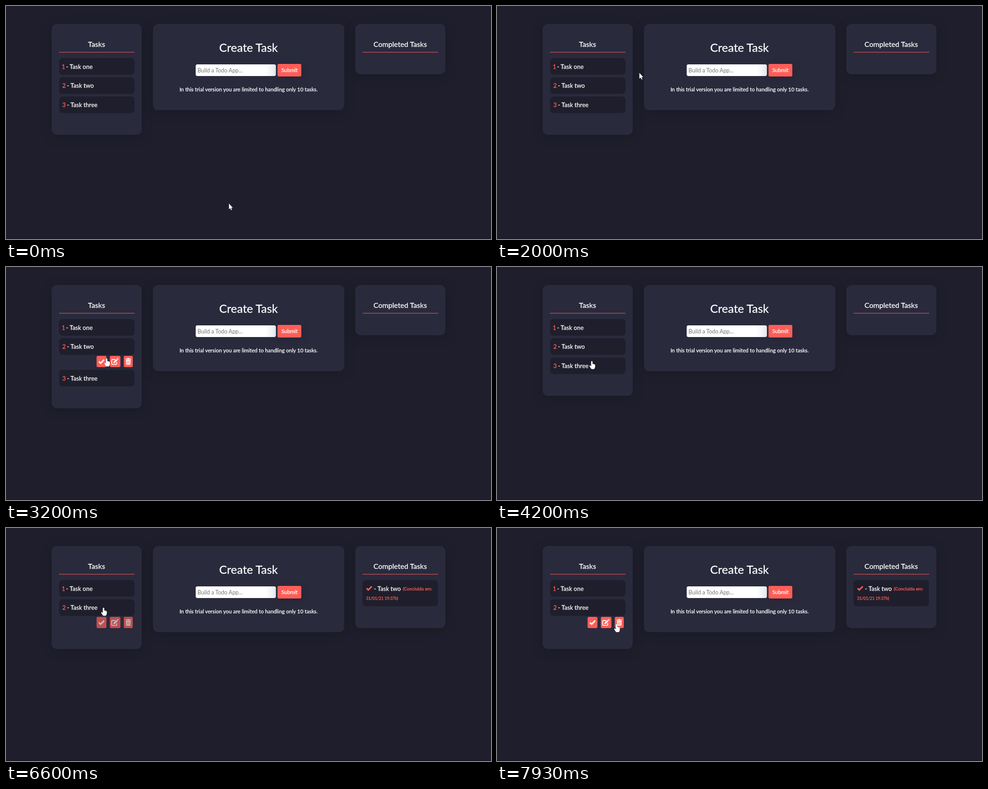
Recreate the animation shown at these times as an HTML page. Size 1079 by 519 pixels, loop 8000 ms.

```html
<!DOCTYPE html>
<html lang="en">
<head>
<meta charset="utf-8">
<title>Todo app</title>
<style>
  html, body { margin: 0; width: 100%; height: 100%; overflow: hidden; background: #1f1e2c; }
  svg { display: block; width: 1079px; height: 519px; }
  text { font-family: Lato, "Open Sans", sans-serif; fill: #fff; stroke: #fff; stroke-width: .3px; white-space: pre; }
  .mid { text-anchor: middle; }
  .red { fill: #ff5e57; stroke: none; }
  text.red { stroke: #ff5e57; }
  .hint { fill: #757575; stroke: none; }
  .card { fill: #2a2a3d; filter: drop-shadow(0 4px 12px rgba(0, 0, 0, .17)); }
  .item { fill: #1f1e2c; }
  .submit { filter: drop-shadow(3px 3px 8px rgba(0, 0, 0, .15)); }
  .cursor { fill: #fff; stroke: #15141e; stroke-width: .6px; paint-order: stroke; }
</style>
</head>
<body>
<svg viewBox="0 0 1079 519">
  <defs>
    <linearGradient id="field">
      <stop offset=".87" stop-color="#fff"/>
      <stop offset="1" stop-color="#e6eaf0"/>
    </linearGradient>
    <path id="check" d="M-5.8 .3L-2 4L5.8 -3.8" fill="none" stroke-width="3.2"/>
    <g id="edit">
      <path d="M1-4.5H-5.5a1.3 1.3 0 0 0-1.3 1.3V5a1.3 1.3 0 0 0 1.3 1.3H3A1.3 1.3 0 0 0 4.3 5V1.5" fill="none" stroke="#fff" stroke-width="1.8"/>
      <path d="M-3 3.6L-2.6 .6L3.6-5.6L6.2-3L0 3.2ZM4.4-6.4l1-1q.7-.5 1.4 0l1.2 1.2q.5.7 0 1.4l-1 1Z" fill="#fff"/>
    </g>
    <path id="trash" fill="#fff" fill-rule="evenodd" d="M-6-6H-2.5L-1.7-7.3H1.7L2.5-6H6V-4.2H-6ZM-5.2-3.4H5.2L4.7 6Q4.6 7.3 3.3 7.3H-3.3Q-4.6 7.3-4.7 6ZM-2.9-1.4V5.2H-1.9V-1.4ZM-.5-1.4V5.2H.5V-1.4ZM1.9-1.4V5.2H2.9V-1.4Z"/>
    <path id="arrow" d="M0 0V12.8L3 10.2L4.9 14.8L6.8 14L4.9 9.4H8.6Z"/>
    <path id="hand" d="M-1.6 1.6a1.6 1.6 0 0 1 3.2 0V6L6 7.2Q7.4 7.8 7.3 9.6V12.5Q7 18 3.2 18H.6Q-1.4 18-2.4 16L-5.2 11.4Q-5.4 9.2-3.2 10L-1.6 11.4Z"/>
  </defs>
  <g id="scene"></g>
  <use id="pointer" class="cursor"/>
  <rect y="518" width="1079" height="1" fill="#14131c"/>
</svg>
<script>
const scene = document.getElementById('scene');
const pointer = document.getElementById('pointer');
const RATE = 15, LOOP = 8000;

// pointer path: tick, x, y
const path = [
  [11, 496, 440], [19, 478, 226.5], [24, 374, 168], [28, 335, 137], [36, 262, 185], [42, 262, 185],
  [50, 211, 209.5], [85, 211, 209.5], [86, 210, 207], [91, 217, 177.5], [102, 217, 177.5],
  [110, 263.5, 207], [117, 263.5, 207], [119, 266, 214]
];

const rect = (x, y, w, h, r, attrs) =>
  `<rect x="${x}" y="${y}" width="${w}" height="${h}" rx="${r}" ${attrs}/>`;
const text = (x, y, size, str, cls = '') =>
  `<text x="${x}" y="${y}" font-size="${size}" class="${cls}">${str}</text>`;
const icon = (name, x, y, attrs = '') => `<use href="#${name}" x="${x}" y="${y}" ${attrs}/>`;
const card = (x, w, bottom) => rect(x, 40, w, bottom - 40, 12, 'class="card"');
const item = (x, y, h = 37) => rect(x, y, 168, h, 8, 'class="item"');
const header = (x, title) =>
  text(x, 91, 16.1, title, 'mid') + rect(x - 83.5, 102.5, 168, 1, 0, 'class="red"');

const task = (n, name, y) => item(118, y) +
  text(n === 1 ? 124 : 125.3, y + 23.5, 13.4, n, 'red') +
  text(n === 1 ? 133.5 : 135.5, y + 23.5, 13.4, '- ' + name);

const buttons = alpha => `<g opacity="${alpha}">` +
  [[201.5, 22], [231, 23.5], [262, 20]].map(([x, w]) => rect(x, 198, w, 25, 3, 'class="red"')).join('') +
  icon('check', 212.5, 210.3, 'stroke="#fff"') + icon('edit', 242, 210.5) + icon('trash', 272, 210.3) + '</g>';

function center() {
  return card(327, 425.5, 232) +
    text(539.5, 101.5, 25.8, 'Create Task', 'mid') +
    rect(422, 130, 178.5, 26, 4, 'fill="url(#field)"') +
    text(426, 148, 12.4, 'Build a Todo App...', 'hint') +
    rect(604, 129, 53, 28, 3, 'class="red submit"') +
    text(630.7, 146.5, 11.8, 'Submit', 'mid') +
    text(539.7, 189.7, 11.75, 'In this trial version you are limited to handling only 10 tasks.', 'mid');
}

function tasks(tick) {
  const removed = tick >= 71;
  const start = removed ? 99 : 38;
  const open = tick >= start && (removed || tick < 63);
  const bottom = removed ? (open ? 269.5 : 244) : (open ? 314.5 : 287);
  const names = removed ? ['Task one', 'Task three'] : ['Task one', 'Task two', 'Task three'];
  return card(101.5, 200.5, bottom) + header(201.5, 'Tasks') +
    names.map((name, i) => task(i + 1, name, 116 + 42.75 * i + (open && i > 1 ? 27.5 : 0))).join('') +
    (open ? buttons(Math.min(1, .7 + (tick - start) * .15)) : '');
}

function completed(tick) {
  const done = tick >= 73;
  return card(777, 200.5, done ? 223 : 152) + header(877, 'Completed Tasks') + (done ?
    item(793, 116, 58.5) + icon('check', 808, 134, 'stroke="#ff5e57"') +
    text(818.5, 139.5, 13.4, '- Task two') +
    text(883, 139.3, 10.1, '(Concluída em:', 'red') +
    text(801, 160.3, 8.9, '31/01/21 19:37h)', 'red') : '');
}

function locate(tick) {
  const i = path.findIndex(p => p[0] > tick);
  if (i === 0) return path[0].slice(1);
  if (i < 0) return path[path.length - 1].slice(1);
  const a = path[i - 1], b = path[i], k = (tick - a[0]) / (b[0] - a[0]);
  return [a[1] + (b[1] - a[1]) * k, a[2] + (b[2] - a[2]) * k];
}

let last = -1;
function draw(now) {
  const tick = Math.floor(now % LOOP * RATE / 1000 + .06);
  if (tick !== last) {
    last = tick;
    scene.innerHTML = tasks(tick) + center() + completed(tick);
    const [x, y] = locate(tick);
    const hand = x < 286 && tick !== 86 && tick !== 87;
    pointer.setAttribute('href', hand ? '#hand' : '#arrow');
    pointer.setAttribute('x', x);
    pointer.setAttribute('y', y);
  }
  requestAnimationFrame(draw);
}
draw(0);
</script>
</body>
</html>
```
